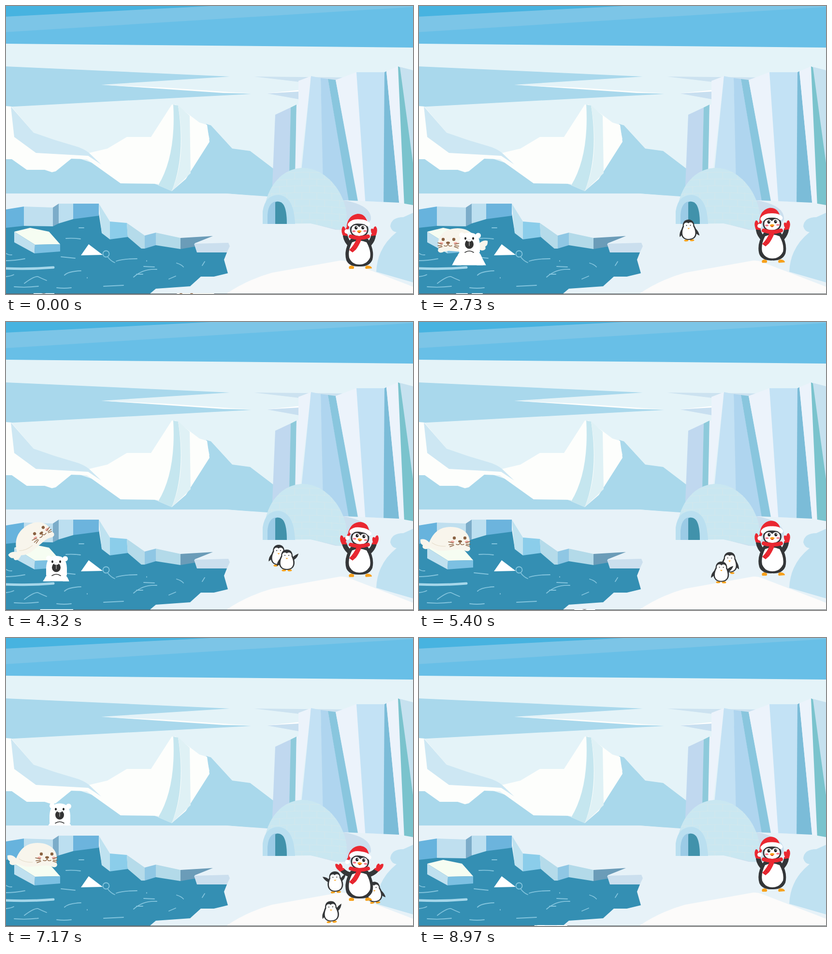
These frames come from a looping animation (842 by 596 pixels, 9000 ms). An HTML page:

```html
<!DOCTYPE html>
<html lang="en">
<head>
<meta charset="utf-8">
<title>Arctic bay</title>
<style>
html, body { margin: 0; width: 100%; height: 100%; overflow: hidden; background: #e4f3f8; }
svg { display: block; width: 842px; height: 596px; }
</style>
</head>
<body>
<svg viewBox="0 0 842 596" xmlns="http://www.w3.org/2000/svg">
  <defs>
    <clipPath id="sea"><path d="M0 0H842V536.5H0ZM0 594.6H842V596H0Z"/></clipPath>
    <clipPath id="land"><path d="M0 0H842V388H0Z"/></clipPath>
    <clipPath id="dome"><path d="M532 451C532 372 573 335 615 335C666 336 705 392 705 438Q706 463 690 463L630 450Z"/></clipPath>
  </defs>
  <g id="scene"></g>
  <g id="actors"></g>
</svg>
<script>
const LOOP = 9000, STEP = 30;
const $ = id => document.getElementById(id);
const poly = (fill, points) => `<polygon fill="${fill}" points="${points}"/>`;
const path = (fill, d, extra = '') => `<path fill="${fill}" d="${d}" ${extra}/>`;
const line = (color, width, d) =>
  path('none', d, `stroke="${color}" stroke-width="${width}" stroke-linecap="round" stroke-linejoin="round"`);
const oval = (fill, x, y, rx, ry = rx) => `<ellipse fill="${fill}" cx="${x}" cy="${y}" rx="${rx}" ry="${ry}"/>`;
const pair = (fill, x, gap, y, rx, ry) => oval(fill, x - gap, y, rx, ry) + oval(fill, x + gap, y, rx, ry);
const group = (id, body) => `<g id="${id}">${body}</g>`;

function sky() {
  return poly('#e4f3f8', '0,0 842,0 842,596 0,596')
    + poly('#68bfe7', '0,0 842,0 842,86 0,78')
    + poly('#7cc5e7', '0,0 842,0 842,2 0,54')
    + poly('#47b3e0', '0,0 424,0 0,22')
    + poly('#a9d8ec', '0,125 463,146 197,163 507,182 0,209')
    + poly('#fdfefd', '197,163 330,169 505,181 450,180')
    + poly('#cce2f0', '513,146 720,148 720,153 606,157')
    + poly('#c8dff0', '540,181 606,176 606,193')
    + poly('#fff', '538,181 606,174 606,177');
}

function mountains() {
  return poly('#a9d8eb', '0,317 135,310 343,380 421,275 414,244 424,247 468,295 505,300 555,338 555,396 455,388 0,388')
    + poly('#fdfefc', '0,207 11,208 57,262 100,278 150,293 172,304 210,295 250,271 300,271 343,204 351,204 400,241 416,246 421,281 372,358 343,383 315,371 315,368 237,367 167,317 135,316 103,342 95,344 80,339 43,339 12,317 0,317')
    + path('#cde7f3', 'M10 208L57 262L100 277L150 292Q168 299 176 308L197 328L170 310L62 304L17 271Z')
    + path('#c5e6ef', 'M346 204L356 206Q372 310 343 383L315 371Q352 310 346 204Z')
    + path('#dff1f5', 'M356 206L380 227L382 346L343 383Q374 310 356 206Z');
}

function cliffs() {
  return poly('#c0d8ef', '557,225 589,210 587,395 550,395')
    + poly('#8ecadb', '589,210 601,204 599,350 586,350')
    + poly('#ecf3fb', '601,204 605,204 605,155 631,145 607,350 598,350')
    + poly('#c3e1f4', '631,145 651,149 658,400 605,400')
    + poly('#afd5ef', '651,149 666,151 712,415 657,415')
    + poly('#89c6de', '666,151 682,153 730,415 711,415')
    + poly('#ecf3fb', '682,153 725,137 744,415 731,415')
    + poly('#c3e2f5', '725,137 784,137 781,415 744,415')
    + poly('#7bbcd8', '783,137 787,135 814,415 781,415')
    + poly('#ecf3fb', '787,135 811,125 824,415 814,415')
    + poly('#c6e1ef', '811,125 842,133 842,350 830,300')
    + poly('#7ac3cd', '811,125 815,127 842,325 842,415 824,415');
}

function igloo() {
  let bricks = '';
  for (let row = 0; row < 8; row++) {
    const y = 345 + row * 14;
    bricks += `M530 ${y + 4}Q620 ${y - 6} 710 ${y + 4}`;
    for (let x = 535 + row % 2 * 15; x < 706; x += 31) bricks += `M${x} ${y}v13`;
  }
  return path('#cbdfee', 'M698 402Q757 412 755 442Q742 466 682 463L628 449Z')
    + `<g clip-path="url(#dome)">${poly('#c9e7f1', '525,330 710,330 710,466 525,466')}${line('#d3e8ed', 1.2, bricks)}</g>`
    + path('#badff0', 'M531 451V425Q536 391 564 391Q596 394 598 451Z')
    + path('#9bcbe6', 'M541 451V432Q543 404 562 404Q580 408 581 451Z')
    + path('#4192ab', 'M557 451V406Q567 402 574 411Q581 422 581 451Z');
}

function bay() {
  const waves = 'M0 512q6 4 12 3M0 527q18 0 39-4M0 560q10-1 16-4M17 581q25 2 50-1M38 574q20-15 28-14q8 4 18 8'
    + 'M105 583q15 2 30 0M121 557q8-8 34-9M114 519l29 3M151 459l10 0M168 562v1M124 481q15-1 30 1M202 580q20-1 41-2'
    + 'M228 528q14-5 43-5M264 561q20-18 48-16M270 555h13M285 539l22 1M337 565l14-6M353 532q10 3 14 8M406 537l5-8M291 527v1M211 520q6 8 14 11';
  return poly('#348fb3', '0,456 109,445 192,430 198,468 215,480 252,476 280,500 310,492 361,500 390,490 395,509 457,510 451,525 459,553 430,560 403,560 383,578 381,580 310,585 297,596 0,596')
    + poly('#67b3dd', '0,421 37,415 37,455 0,459')
    + poly('#bfdfef', '37,415 97,417 97,456 37,455')
    + poly('#7cacc9', '97,417 109,409 109,450 97,456')
    + poly('#bcdff0', '109,409 139,409 139,441 109,450')
    + poly('#6cb4dd', '139,409 192,409 192,434 139,441')
    + poly('#bfe2f0', '192,409 215,446 215,483 198,470')
    + poly('#8bcdea', '215,446 250,449 252,478 215,483')
    + poly('#b5dbea', '250,449 287,475 287,502 280,502 252,478')
    + poly('#8fc7e4', '287,475 310,469 310,495 287,502')
    + poly('#b3dae9', '310,469 361,480 361,503 310,495')
    + poly('#6b9cb8', '361,480 428,476 388,492 396,497 361,503')
    + poly('#cbdfee', '389,492 460,490 463,497 457,510 395,510')
    + line('#83c4dd', 1.8, waves)
    + line('#a6d7ea', 5, 'M0 543Q50 545 98 541')
    + `<circle cx="207" cy="513" r="6.5" fill="none" stroke="#83c4dd" stroke-width="1.8"/>`
    + poly('#fff', '155,516 171,493 200,515')
    + poly('#f6fdf2', '17,467 50,459 89,467 112,493 60,494')
    + poly('#bfe0ef', '17,467 60,494 59,512 17,489')
    + poly('#7cc0e2', '60,494 112,493 112,508 59,512');
}

function snow() {
  return path('#fcfbfa', 'M455 596Q500 566 550 552L690 527Q700 526 710 530L842 581V596Z')
    + path('#bfe1f1', 'M842 428L822 437Q797 437 795 456Q798 467 808 468Q768 500 766 550L842 572Z')
    + poly('#555d61', '0,595 842,595 842,596 0,596');
}

function bear() {
  const arm = side => group('bear' + side, line('#fff', 17, 'M0 0V36') + oval('#2d2d2d', 0, 40, 3, 4)
    + line('#2d2d2d', 1.3, 'M-4 45v.5M0 46.5v.5M4 45v.5'));
  return arm('L') + arm('R')
    + path('#fff', 'M-18 40Q-31 54 -26 74L-24 92Q-35 104 -33 118Q-27 128 -22 138Q-23 143 -12 143Q-3 143 -4 138L-2 114H4L6 138Q5 143 13 143Q24 143 23 137Q28 128 34 117Q38 104 31 92L28 74Q31 54 18 40Z')
    + oval('#fff', -15.5, 7, 5.5) + oval('#fff', 18.5, 8, 5.5)
    + path('#fff', 'M-21 27Q-20 2 0 2Q21 2 22 27L22 42Q12 50 0 50Q-14 50 -21 42Z')
    + pair('#222', 0, 8, 14, 2, 2.7)
    + oval('#333', 0, 26, 9, 9.5)
    + path('#fff', 'M-5 18Q0 15 5 18Q4 21 0 20.5Q-4 21 -5 18Z') + line('#ddd', 1, 'M0 21V29')
    + line('#333', 1.6, 'M-9 43Q0 37 9 43');
}

function seal() {
  const fur = '#f8f5ec', brown = '#8a6242';
  return path(fur, 'M-36 6Q-44 -3 -54 0Q-55 9 -49 12Q-52 19 -42 20Q-36 19 -30 15Z')
    + path(fur, 'M-38 12C-30 -12 -16 -26 8 -26C35 -26 49 -10 48 6Q46 14 49 19Q48 26 40 24Q32 20 22 21L-5 23Q-26 25 -38 12Z')
    + line('#e7dfcd', 1.2, 'M-30 7Q-18 15 -2 14')
    + pair('#efaaa4', 27, 15, 5, 4, 2.5) + pair(brown, 27, 11, -3, 3.2, 3.2)
    + oval(brown, 28, 4, 4, 2.5)
    + line(brown, 1.4, 'M28 6Q27 13 20 10M28 6Q29 13 36 10M4 5l10 2M5 11l9-1M7 15l8-3M49 4l-9 3M49 10l-8 0M47 14l-7-2');
}

function chick(id) {
  const arm = side => group(id + side, path('#343638', 'M-2.5 0Q-5 9 0 17Q4 9 2.5 0Z'));
  return arm('L') + arm('R')
    + pair('#f7a11c', 0, 6, 21, 4.5, 2)
    + path('#343638', 'M0 -22C9 -22 12 -15 12 -9C19 3 18 20 0 20C-18 20 -19 3 -12 -9C-12 -15 -9 -22 0 -22Z')
    + path('#fff', 'M0 -14C3 -18 11 -16 9.5 -8C16 4 15 18 0 18C-15 18 -16 4 -9.5 -8C-11 -16 -3 -18 0 -14Z')
    + pair('#222', 0, 4, -10, 1, 1) + path('#f7a11c', 'M-2.5 -4.5h5L0 -2Z');
}

function santa() {
  const black = '#343638', red = '#ea2831', orange = '#f7a11c';
  const arm = side => group('santa' + side, line(black, 10, 'M5 8Q-4 0 -6 -11')
    + path(red, 'M-12 -14Q-16 -25 -11 -31Q-7 -31 -6 -25Q-3 -28 -1 -25Q0 -19 -4 -14Z')
    + line(red, 4, 'M-10 -14L-3 -13'));
  return arm('L') + arm('R')
    + path(orange, 'M710 525Q707 519 715 518Q723 520 719 525ZM744 525Q741 519 748 518Q757 519 757 524Z')
    + path(black, 'M713 463Q731 454 749 463Q763 486 758 506Q752 521 731 520Q710 521 704 507Q698 486 713 463Z')
    + path('#fff', 'M716 470Q731 463 746 470Q756 488 753 502Q746 516 731 516Q716 516 710 502Q707 487 716 470Z')
    + group('santaHead',
      oval(black, 731, 444, 19, 17)
      + path('#fff', 'M731 439C736 431 748 434 747 446C746 454 738 457 731 457C724 457 716 454 715 446C714 434 726 431 731 439Z')
      + pair('#222', 731.5, 7, 440, 3, 3.5) + pair('#fff', 732.5, 7, 439, 1, 1)
      + pair('#f57a8a', 731.5, 11.5, 447, 3.5, 1.8)
      + path(orange, 'M726 447Q731 443 736 447Q731 455 726 447Z') + path('#d62b2b', 'M728 449h6Q731 453 728 449Z')
      + path(red, 'M709 433Q703 439 703 446L710 441L711 429L748 428Q744 411 728 411Q708 414 705 437Z')
      + line('#fff', 9, 'M712 433Q718 426 731 427Q744 427 749 433') + oval('#fff', 705, 447, 4.5))
    + path(red, 'M726 461L735 465Q730 477 724 485L717 491L710 486Q721 475 726 461Z')
    + line('#b91d28', 1, 'M713 486l3 2M717 481l4 3')
    + line(red, 8, 'M713 458Q731 464 749 458');
}

$('scene').innerHTML = sky() + mountains() + cliffs()
  + poly('#e7f2f8', '0,388 455,388 540,394 700,402 813,407 842,412 842,596 0,596')
  + igloo() + bay() + snow();
$('actors').innerHTML = `<g clip-path="url(#sea)">${group('seal', seal())}</g>`
  + group('bearClip', group('bear', bear()))
  + group('late', chick('late')) + group('second', chick('second'))
  + group('santa', santa()) + group('first', chick('first'));

const ramp = (t, from, to) => Math.min(1, Math.max(0, (t - from) / (to - from)));
const ease = (t, from, to) => { const u = ramp(t, from, to); return u * u * (3 - 2 * u); };
const bump = (t, from, to) => Math.sin(Math.PI * ramp(t, from, to));
const stay = (t, from, to, fade) => ease(t, from, from + fade) - ease(t, to - fade, to);
const wave = (t, period, peak = 0) => Math.cos(2 * Math.PI * (t - peak) / period);
const place = (id, transform) => $(id).setAttribute('transform', transform);

// Straight walk through [time, x, y] stops, carried on past the last one.
function walk(stops, t) {
  const next = stops.findIndex(s => s[0] > t);
  const i = next < 0 ? stops.length - 1 : Math.max(1, next);
  const [t0, x0, y0] = stops[i - 1], [t1, x1, y1] = stops[i];
  const u = Math.max(0, (t - t0) / (t1 - t0));
  return [x0 + (x1 - x0) * u, y0 + (y1 - y0) * u];
}

function drawBear(t) {
  const ashore = t >= 6930 && t < 8370, leaving = t >= 8370;
  let x = 78 + 26 * ease(t, 0, 1400) + 304 * ease(t, 4700, 5700);
  let y = 560 - stay(t, 0, 5000, 700) * (84 + 9 * wave(t, 4400, 2730)) - 87 * stay(t, 5600, 6930, 400);
  let armL = 12 + 16 * bump(t, 1800, 3600) + 153 * ease(t, 5000, 5900), armR = armL;
  if (ashore) {
    x = 111;
    y = 392 - 147 * stay(t, 6930, 8370, 600);
    armL = 75;
    armR = 60;
  } else if (leaving) {
    x = 272;
    y = 575 - 35 * ramp(t, 8370, 8970);
    armL = armR = 12;
  }
  $('bearClip').setAttribute('clip-path', `url(#${ashore ? 'land' : 'sea'})`);
  place('bear', `translate(${x} ${y})`);
  place('bearL', `translate(-20 58) rotate(${armL})`);
  place('bearR', `translate(20 60) rotate(${-armR})`);
}

function drawSeal(t) {
  const dash = ramp(t, 7450, 8350);
  const x = 400 - 312 * ease(t, 980, 1900) - 40 * ease(t, 2800, 3900) + 9 * ease(t, 4400, 5000) + 214 * dash;
  const y = 600 - 114 * ease(t, 850, 1800) - 36 * ease(t, 2900, 4200) - 160 * dash + 305 * dash * dash;
  const turn = 35 * bump(t, 900, 1800) - 37 * bump(t, 3300, 5100) + 40 * dash ** 3;
  place('seal', `translate(${x} ${y}) scale(${t < 3300 ? -1 : 1} 1) rotate(${turn})`);
}

const DOOR = [564, 428];
const firstWalk = [[1500, ...DOOR], [2730, 558, 464], [4320, 581, 493], [6510, 671, 543], [7770, 674, 588]];
const secondWalk = [[3050, ...DOOR], [4320, 564, 483], [6510, 723, 514], [7770, 798, 538]];

function drawChick(id, [x, y], shown, t, liftL, liftR) {
  const flap = 8 * wave(t, 750);
  $(id).setAttribute('opacity', shown);
  place(id, `translate(${x} ${y}) rotate(${flap / 2})`);
  place(id + 'L', `translate(-12 -2) rotate(${liftL + flap})`);
  place(id + 'R', `translate(12 -2) rotate(${flap - liftR})`);
}

function drawChicks(t) {
  const out = 30 * ease(t, 1500, 1800), peek = stay(t, 6600, 8340, 500);
  drawChick('first', walk(firstWalk, t), stay(t, 600, 8370, 200), t, out, out + 105 * ease(t, 3500, 3900));
  drawChick('second', walk(secondWalk, t), stay(t, 2850, 8370, 200), t, 30, 30);
  drawChick('late', [728 - 47 * peek, 498 + 7 * peek], stay(t, 6600, 8370, 60), t, 135, 135);
}

function drawSanta(t) {
  const turn = 38 * Math.max(0, wave(t, 690, 6510)) ** 2;
  place('santa', `translate(0 ${9.5 + 9.5 * wave(t, 1200, -30)})`);
  place('santaL', `translate(708 468) rotate(${-turn})`);
  place('santaR', `translate(754 468) scale(-1 1) rotate(${-turn})`);
  place('santaHead', `rotate(${2 + 5 * wave(t, 3180, 4320)} 731 456)`);
}

const start = performance.now();
function frame() {
  const t = Math.floor((performance.now() - start) % LOOP / STEP) * STEP;
  drawBear(t);
  drawSeal(t);
  drawChicks(t);
  drawSanta(t);
  requestAnimationFrame(frame);
}
frame();
</script>
</body>
</html>
```
